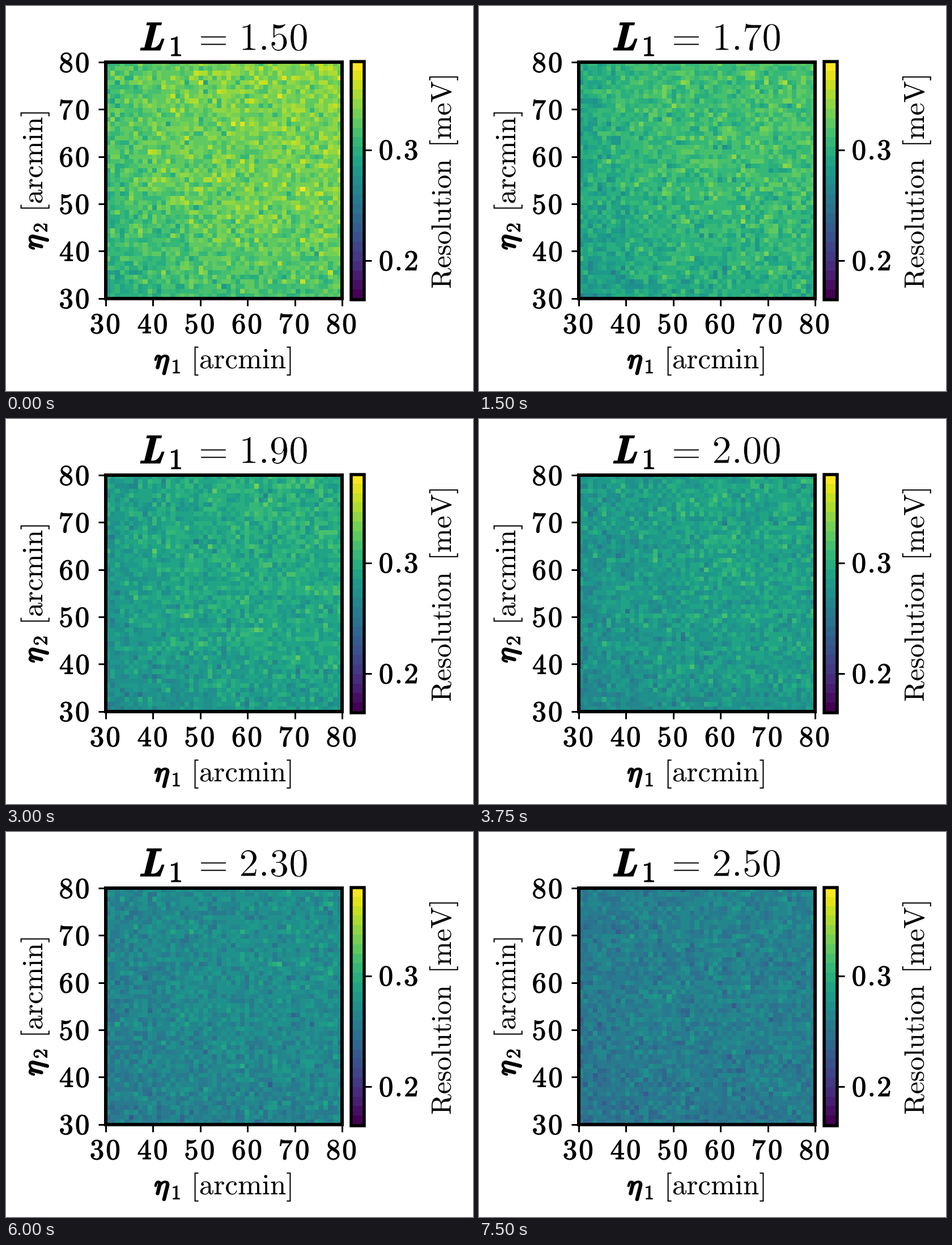
A matplotlib script that plays this animation: 824 px wide and 679 px high, repeating every 8 s.

```python
import numpy as np
import matplotlib.pyplot as plt
from matplotlib.animation import FuncAnimation
from matplotlib.patches import PathPatch, Rectangle
from matplotlib.path import Path
from matplotlib.textpath import TextPath

plt.rcParams["mathtext.fontset"] = "cm"

W, H, DPI = 824, 679, 100
PT = 72 / DPI                       # points per pixel
LEFT, RIGHT, TOP, BOTTOM = 176, 593, 99, 515.5
BAR = (609.5, 632.5, 98, 517.5)     # left, right, top, bottom
CELLS, LEVELS, STEPS = 51, 25, 11
VMIN, VMAX = 0.165, 0.3795

fig = plt.figure(figsize=(W / DPI, H / DPI), dpi=DPI, facecolor="white")
ax = fig.add_axes([0, 0, 1, 1])
ax.axis("off")


def math_path(s, size, slant=0.0):
    p = TextPath((0, 0), f"${s}$", size=size)
    v = np.array(p.vertices)
    v[:, 0] += slant * v[:, 1]
    return Path(v, p.codes)


def roman(s, size):
    return math_path(rf"\mathrm{{{s}}}", size)


def bold(s, size):
    """Bold figures set on the wide spacing of the extended face."""
    parts, pen = [], 0.0
    for ch in s:
        p = math_path(rf"\mathbf{{{ch}}}", size)
        box = p.get_extents()
        adv = (0.313 if ch == "." else 0.5635) * size
        shift = pen + adv / 2 - (box.x0 + box.x1) / 2
        parts.append(Path(p.vertices + [shift, 0], p.codes))
        pen += adv
    return Path.make_compound_path(*parts)


def place(path, pos, base, vertical=False, right=False):
    """Set a path on a baseline, its ink centred on (or ending at) pos."""
    box = path.get_extents()
    ref = box.x1 if right else (box.x0 + box.x1) / 2
    along, up = path.vertices[:, 0] - ref, path.vertices[:, 1]
    if vertical:
        v = np.column_stack([base - up, pos - along])
    else:
        v = np.column_stack([pos + along, base - up])
    return Path(v, path.codes)


def text(path, pos, base, weight=0.0, **kw):
    patch = PathPatch(place(path, pos, base, **kw), facecolor="black",
                      edgecolor="black" if weight > 0 else "white",
                      linewidth=abs(weight) * PT, joinstyle="round")
    return ax.add_patch(patch)


def frame(x0, x1, y0, y1, width):
    ax.add_patch(Rectangle((x0, y0), x1 - x0, y1 - y0, fill=False,
                           edgecolor="black", linewidth=width * PT,
                           joinstyle="miter"))


def tick(x, y, dx, dy):
    ax.plot([x, x + dx], [y, y + dy], color="black", linewidth=3 * PT,
            solid_capstyle="butt")


def field(step):
    """Noisy resolution map for one path length."""
    length = 1.5 + 0.1 * step
    mean = 0.157 + 0.25 / length
    u = np.linspace(0, 1, CELLS)
    fall = np.exp(-3 * u)
    depth = 0.024 * (2.9 - length) / 1.4
    dip = fall[None, :] + fall[::-1, None] - 2 * fall.mean()
    noise = np.random.default_rng(40 + step).normal(size=(CELLS, CELLS))
    return mean - depth * dip + 0.035 * mean * noise


def number(step):
    return place(roman(f"{1.5 + 0.1 * step:.2f}", 69), 531, 78, right=True)


cmap = plt.get_cmap("viridis", LEVELS)
style = dict(cmap=cmap, interpolation="nearest", aspect="auto")
fields = [field(k) for k in range(STEPS)]
numbers = [number(k) for k in range(STEPS)]

heat = ax.imshow(fields[0], vmin=VMIN, vmax=VMAX,
                 extent=(LEFT, RIGHT, BOTTOM, TOP), **style)
ax.imshow(np.arange(LEVELS)[::-1, None], vmin=0, vmax=LEVELS - 1,
          extent=(BAR[0], BAR[1], BAR[3], BAR[2]), **style)
ax.set_xlim(0, W)
ax.set_ylim(H, 0)

frame(LEFT, RIGHT, TOP, BOTTOM, 6)
frame(*BAR, 5.5)

for k in range(6):
    label = bold(str(30 + 10 * k), 50.5)
    x = LEFT + (RIGHT - LEFT) * k / 5
    y = BOTTOM + (TOP - BOTTOM) * k / 5
    tick(x, BOTTOM, 0, 13)
    tick(LEFT, y, -13, 0)
    text(label, x - 1.2, 577, 1.2)
    text(label, 120.5, y + 17.3, 1.2)

for value in (0.2, 0.3):
    y = 253.5 + (0.3 - value) * 1955
    tick(BAR[1], y, 13, 0)
    text(bold(f"{value:.1f}", 50.5), 692.5, y + 17, 1.2)

# axis labels
eta = math_path(r"\eta", 50.5)
unit = roman("[arcmin]", 51.2)
text(eta, 275, 639, 3)
text(bold("1", 35), 300.5, 647.5, 1)
text(unit, 417.5, 639)
text(eta, 416.5, 64, 3, vertical=True)
text(bold("2", 35), 391, 72.5, 1, vertical=True)
text(unit, 272.5, 64, vertical=True)
text(roman("Resolution", 49.4), 384, 785, vertical=True)
text(roman("[meV]", 51), 184, 785, vertical=True)

# title
text(math_path(r"\mathbf{L}", 70, slant=0.25), 258, 78, 1.5)
text(bold("1", 50.5), 300, 88, 1.2)
text(math_path("=", 67), 366, 78, -0.5)
value_text = text(roman("1.50", 69), 531, 78, -0.5, right=True)


def update(i):
    step = min(i // 3, STEPS - 1)
    heat.set_data(fields[step])
    value_text.set_path(numbers[step])
    return heat, value_text


anim = FuncAnimation(fig, update, frames=32, interval=250, repeat=True,
                     repeat_delay=0, blit=False)
plt.show()
```
